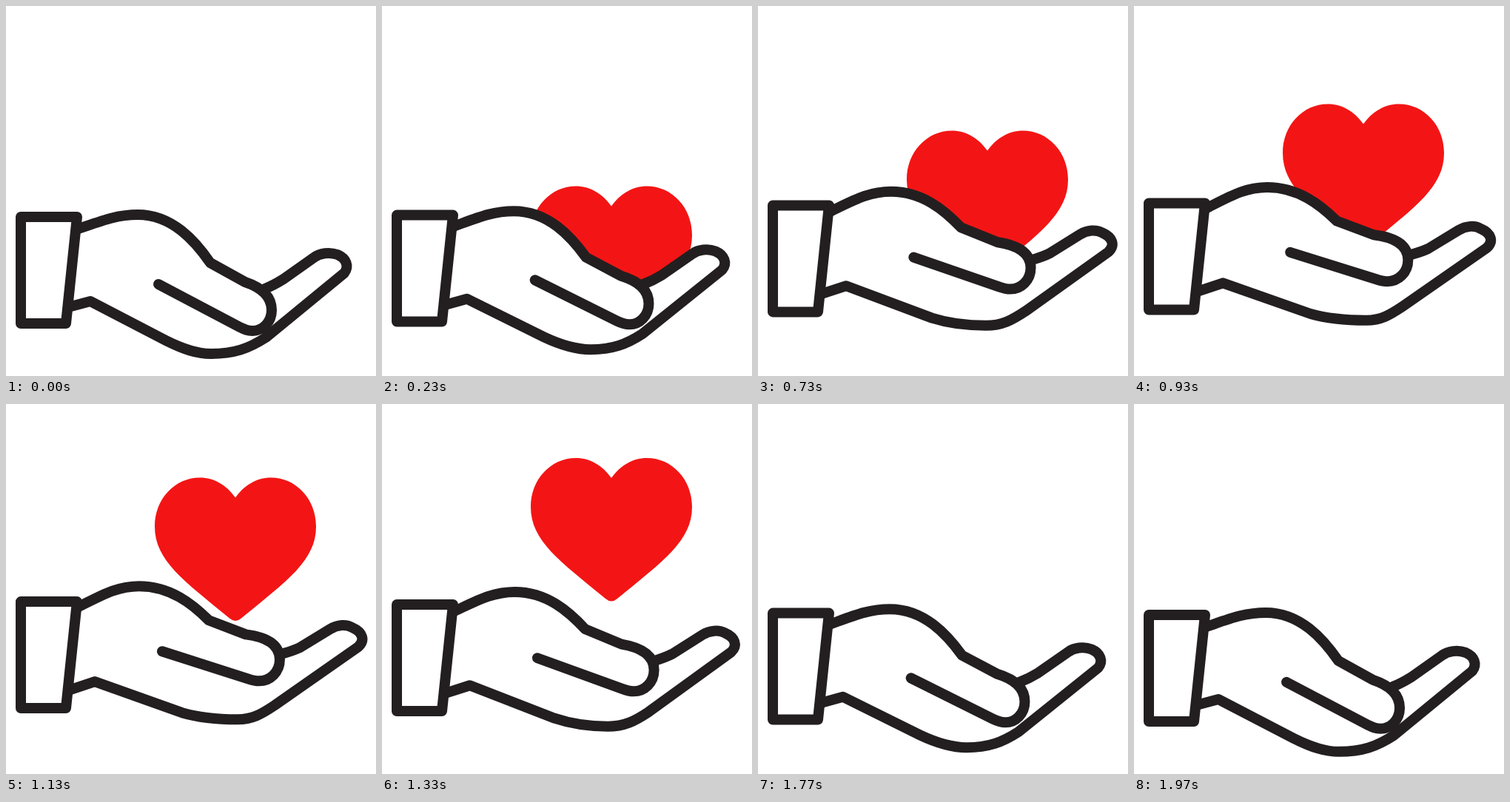
An HTML page that plays this animation: 500x500 px, repeating every 2010 ms.

```html
<!DOCTYPE html>
<html lang="en">
<head>
<meta charset="utf-8">
<title>Giving hand</title>
<style>
  html, body { margin: 0; width: 100%; height: 100%; overflow: hidden; background: #fff; }
  svg { display: block; width: 100vw; height: 100vh; }
  .ink { fill: #fff; stroke: #231f20; stroke-width: 14; stroke-linecap: round; stroke-linejoin: round; }
</style>
</head>
<body>
<svg viewBox="0 0 500 500">
  <path id="heart" fill="#f31515" opacity="0" d="M310 27C298 10 281 0 262 0C228 0 201 29 201 66C201 112 240 139 302 190Q310 197 318 190C380 139 419 112 419 66C419 29 392 0 358 0C339 0 322 10 310 27Z"/>
  <path id="backing" fill="#fff"/>
  <path id="palm" class="ink"/>
  <path id="thumb" class="ink"/>
  <path id="cuff" class="ink"/>
</svg>
<script>
const LOOP = 2010, FRAMES_PER_MS = 0.03;
const el = id => document.getElementById(id);

// Each part: lowered pose, raised pose
const poses = {
  palm: [
    "M350 382C360 378 367 374 375 369L416 340C424 334 437 332 448 336C460 341 464 352 457 361L351 448C328 463 308 470 277 470C258 470 240 464 216 452L114 399L84 407",
    "M371 338C381 335 389 333 397 329L438 304C448 298 460 297 468 302C482 308 486 319 476 328L363 407C345 419 333 426 313 426C290 426 262 424 238 417L120 375L84 387"
  ],
  thumb: [
    "M98 301C130 290 150 282 178 282C225 282 256 318 276 347L323 373C350 382 359 396 359 411C359 427 347 439 333 439C326 439 322 437 316 434L206 376",
    "M98 274C130 258 150 246 180 246C222 246 252 270 274 292L324 311C356 315 370 327 370 345C370 362 357 374 342 374C337 374 333 373 327 371L211 334"
  ],
  cuff: [
    "M20 285L96 285L81 429L20 429Z",
    "M20 267L96 267L81 411L20 411Z"
  ]
};

function blend([from, to], k) {
  const ends = to.match(/\d+/g);
  let i = 0;
  return from.replace(/\d+/g, n => (+n + (ends[i++] - n) * k).toFixed(2));
}

function draw(ms) {
  // 30 steps a second, on a 10 ms grid
  const n = Math.floor((Math.floor(ms / 10) * 10 + 3.4) * FRAMES_PER_MS);
  const lift = (1 - Math.cos(2 * Math.PI * n / 60)) / 2 / 0.962;
  for (const id in poses) el(id).setAttribute("d", blend(poses[id], lift));
  el("backing").setAttribute("d", el("palm").getAttribute("d") + "L90 310L275 352Z");

  const top = 156.5 - 105 * Math.sin(0.0575 * (n - 24));
  const fade = Math.max(0, Math.min(1, n / 6, (47 - n) / 6));
  el("heart").setAttribute("transform", `translate(0 ${top.toFixed(2)})`);
  el("heart").setAttribute("opacity", fade);
}

const start = performance.now();
function tick() {
  draw((performance.now() - start) % LOOP);
  requestAnimationFrame(tick);
}
tick();
</script>
</body>
</html>
```
